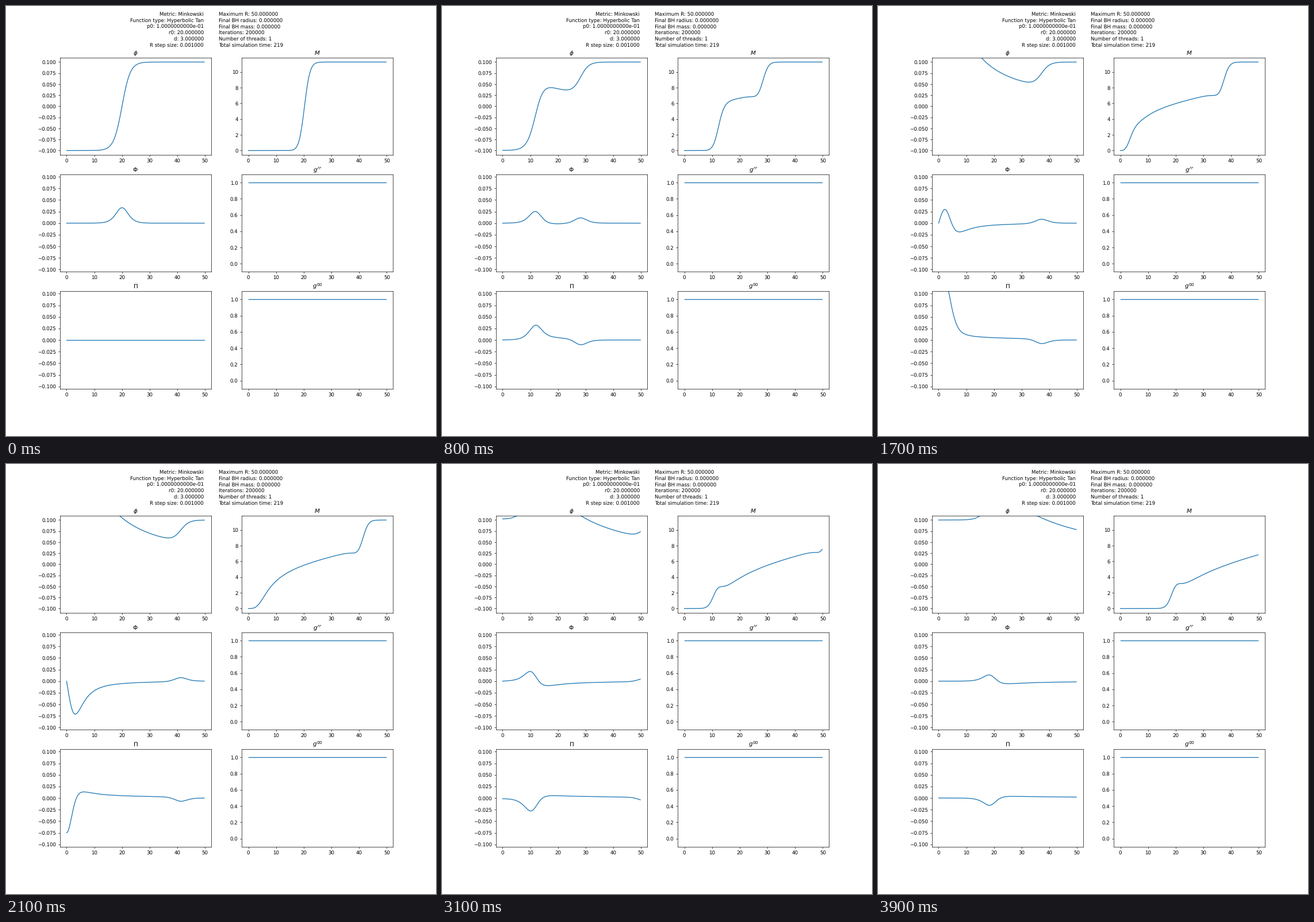
A matplotlib script that plays this animation: 748x748 px, repeating every 4 s.

```python
import numpy as np
import matplotlib.pyplot as plt
from matplotlib.animation import FuncAnimation

SIZE = 748
FRAMES = 40
P0, R0, D = 0.1, 20.0, 3.0

plt.rcParams["font.family"] = "DejaVu Sans"
plt.rcParams["text.hinting"] = "none"

r = np.linspace(1e-3, 49.75, 1000)


def pulse(x):
    """Odd extension of r * phi at t = 0, and its derivative."""
    a = np.abs(x)
    shape = np.tanh((a - R0) / D)
    slope = (1 - shape**2) / D
    return P0 * x * shape, P0 * (shape + a * slope)


def fields(t):
    """Spherical wave: phi, its radial and time derivatives, enclosed mass."""
    u_in, du_in = pulse(r + t)
    u_out, du_out = pulse(r - t)
    u = (u_in + u_out) / 2
    phi = u / r
    grad = ((du_in + du_out) / 2 - phi) / r
    rate = (du_in - du_out) / (2 * r)
    density = 2 * np.pi * r**2 * (grad**2 + rate**2)
    steps = (density[1:] + density[:-1]) / 2 * np.diff(r)
    mass = np.concatenate(([0], np.cumsum(steps)))
    return phi, grad, rate, mass


fig, axes = plt.subplots(3, 2, figsize=(12, 12), dpi=SIZE / 12)

left_info = [
    "Metric: Minkowski",
    "Function type: Hyperbolic Tan",
    "p0: 1.0000000000e-01",
    "r0: 20.000000",
    "d: 3.000000",
    "R step size: 0.001000",
]
right_info = [
    "Maximum R: 50.000000",
    "Final BH radius: 0.000000",
    "Final BH mass: 0.000000",
    "Iterations: 200000",
    "Number of threads: 1",
    "Total simulation time: 219",
]
for x, align, lines in ((0.46, "right", left_info), (0.495, "left", right_info)):
    for i, line in enumerate(lines):
        y = 1 - (17 + 10.75 * i) / SIZE
        fig.text(x, y, line, ha=align, va="baseline", fontsize=10)


def panel(ax, title, values, ylim=None):
    line, = ax.plot(r, values)
    ax.set_title(title)
    ax.set_xlim(-0.05 * r[-1], 1.05 * r[-1])
    if ylim:
        ax.set_ylim(*ylim)
    return line


phi, grad, rate, mass = fields(0)
flat = np.ones_like(r)
curves = [
    panel(axes[0, 0], r"$\phi$", phi, (-0.11, 0.11)),
    panel(axes[1, 0], r"$\Phi$", grad, (-0.105, 0.105)),
    panel(axes[2, 0], r"$\Pi$", rate, (-0.105, 0.105)),
    panel(axes[0, 1], r"$M$", mass, (-0.05 * mass[-1], 1.05 * mass[-1])),
]
panel(axes[1, 1], r"$g^{rr}$", flat, (-0.1, 1.1))
panel(axes[2, 1], r"$g^{00}$", flat, (-0.1, 1.1))


def update(frame):
    for curve, values in zip(curves, fields(frame)):
        curve.set_ydata(values)
    return curves


anim = FuncAnimation(fig, update, frames=FRAMES, interval=100,
                     repeat=True, repeat_delay=0)
plt.show()
```
